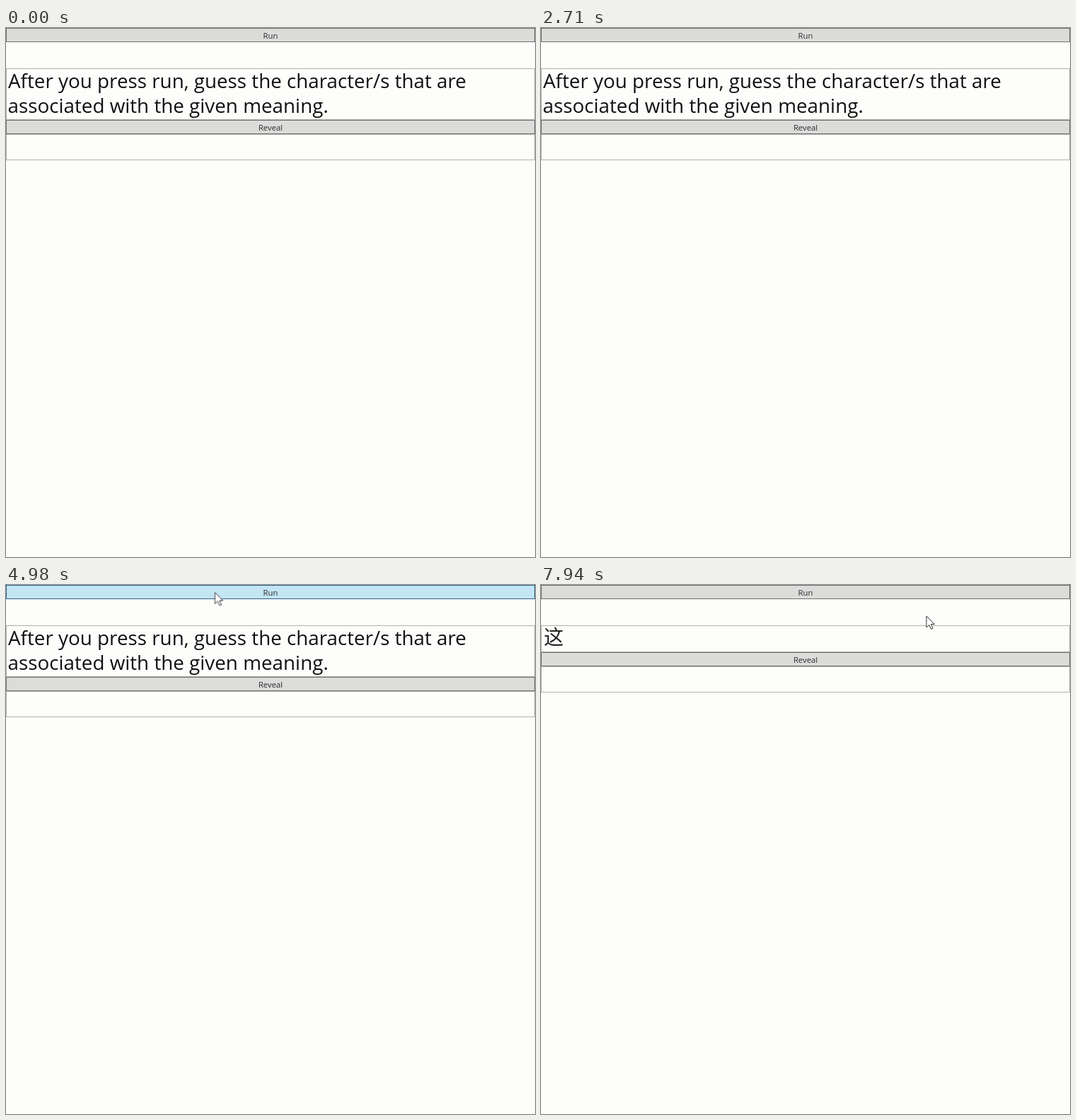
Write an HTML page that moves like this. It is 748x748 px and loops after 8000 ms.

```html
<!DOCTYPE html>
<html lang="en">
<head>
<meta charset="utf-8">
<title>Character quiz</title>
<style>
  html, body { margin: 0; width: 100%; height: 100%; overflow: hidden; background: #fdfdfb; }
  svg { display: block; width: 100%; height: 100%; }
  rect { shape-rendering: crispEdges; stroke-width: 1; }

  .button { fill: #dcdcdb; stroke: #707070; }
  .box { fill: none; stroke: #b2b2a9; }
  .label { font: 11.3px "Open Sans", "Noto Sans", sans-serif; fill: #2b2b2b; text-anchor: middle; }
  .prompt { font: 27.8px "Open Sans", "Noto Sans", sans-serif; fill: #111; }
  .glyph { font: 28px "Noto Sans CJK SC", "Noto Sans CJK", sans-serif; fill: #222; }
  .cursor { fill: #fff; stroke: #333; stroke-width: 1; stroke-linejoin: round; }

  .button.run, .before, .after, .lower, .glyph { animation: 8s step-end infinite; }
  .button.run { animation-name: run; }
  .before { animation-name: before; }
  .after { animation-name: after; }
  .lower { animation-name: lower; }
  .glyph { animation-name: glyph; }
  .cursor { animation: cursor 8s ease-in-out infinite; }

  /* normal, hovered, pressed, hovered, normal */
  @keyframes run {
    0%, 78.5% { fill: #dcdcdb; stroke: #707070; }
    37.5%, 63.75% { fill: #bee6fb; stroke: #3c7fb1; }
    61.9% { fill: #c4e5f3; stroke: #2c628b; }
  }
  @keyframes before { 0% { visibility: visible; } 63.75%, 100% { visibility: hidden; } }
  @keyframes after { 0% { visibility: hidden; } 63.75%, 100% { visibility: visible; } }
  @keyframes lower { 0% { transform: none; } 63.75%, 100% { transform: translateY(-35px); } }
  @keyframes glyph { 0% { visibility: hidden; } 95%, 100% { visibility: visible; } }
  @keyframes cursor {
    0%, 51.5% { transform: translate(290px, -24px); }
    55%, 72.5% { transform: translate(295.5px, 10.5px); }
    80.5%, 93.5% { transform: translate(472.5px, 23.5px); }
    99%, 100% { transform: translate(545px, 44px); }
  }
</style>
</head>
<body>
<svg viewBox="0 0 748 748">
  <rect class="button run" x=".5" y=".5" width="747" height="19"/>
  <text class="label" x="374" y="15">Run</text>

  <g class="before">
    <rect class="box" x=".5" y="57.5" width="747" height="72"/>
    <text class="prompt" x="3" y="85">After you press run, guess the character/s that are</text>
    <text class="prompt" x="2.5" y="120">associated with the given meaning.</text>
  </g>
  <rect class="box after" x=".5" y="57.5" width="747" height="37"/>
  <text class="glyph" x="4" y="84" lang="zh-Hans">这</text>

  <g class="lower">
    <rect class="box" x=".5" y="150.5" width="747" height="36"/>
    <rect class="button" x=".5" y="130.5" width="747" height="19"/>
    <text class="label" x="374" y="145">Reveal</text>
  </g>

  <path class="cursor" d="M0 0V16L3.8 12.5L6.4 18.4L9 17.3L6.5 11.5H11.3Z"/>
</svg>
</body>
</html>
```
